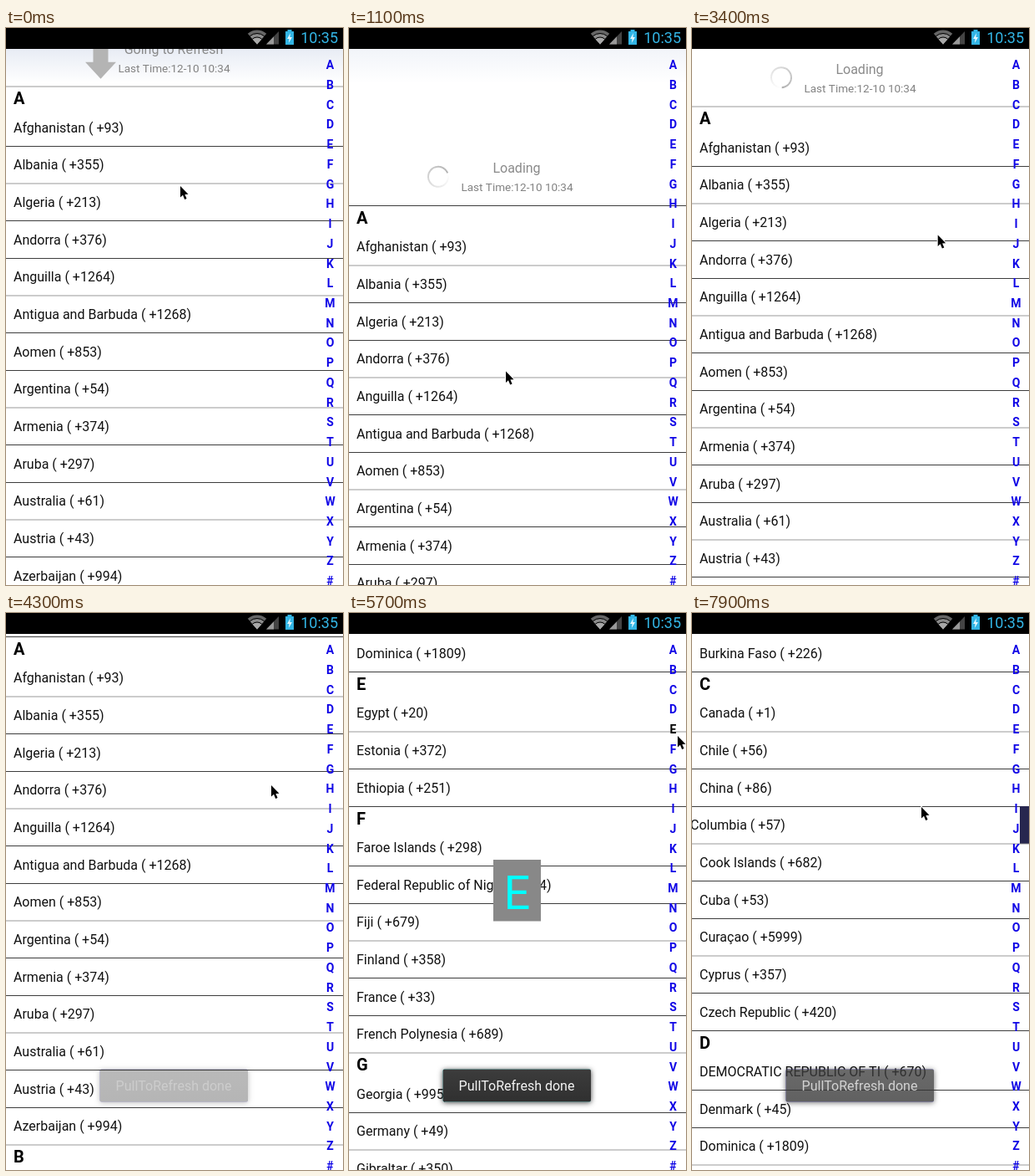
Recreate the animation shown at these times as an HTML page with a canvas. Size 404 px wide and 666 px high, loop 8 s.

```html
<!DOCTYPE html>
<html lang="en">
<head>
<meta charset="utf-8">
<title>Pull to refresh list</title>
<style>
html, body { margin: 0; width: 100%; height: 100%; overflow: hidden; background: #fff; }
canvas { display: block; }
</style>
</head>
<body>
<canvas id="stage" width="404" height="666"></canvas>
<script>
const ctx = document.getElementById('stage').getContext('2d');
const W = 404, H = 666, LOOP = 8000, STEP = 100;
const BAR = 25;                        // status bar height
const ROW = 67, HEAD = 40, REST = 37;  // list units, 1.5 per pixel
const LOADING_TOP = 139;
const FONT = 'Roboto, "Noto Sans", sans-serif';
const LETTERS = 'ABCDEFGHIJKLMNOPQRSTUVWXYZ#';

const SECTIONS = {
  A: 'Afghanistan 93,Albania 355,Algeria 213,Andorra 376,Anguilla 1264,Antigua and Barbuda 1268,' +
     'Aomen 853,Argentina 54,Armenia 374,Aruba 297,Australia 61,Austria 43,Azerbaijan 994',
  B: 'Bahamas 1242,Burkina Faso 226',
  C: 'Canada 1,Chile 56,China 86,Columbia 57,Cook Islands 682,Cuba 53,Curaçao 5999,Cyprus 357,Czech Republic 420',
  D: 'DEMOCRATIC REPUBLIC OF TI 670,Denmark 45,Dominica 1809',
  E: 'Egypt 20,Estonia 372,Ethiopia 251',
  F: 'Faroe Islands 298,Federal Republic of Niger 234,Fiji 679,Finland 358,France 33,French Polynesia 689',
  G: 'Georgia 995,Germany 49,Gibraltar 350'
};

const items = [];
for (const [letter, rows] of Object.entries(SECTIONS)) {
  rows.split(',').forEach((row, i) => {
    const cut = row.lastIndexOf(' ');
    items.push({ label: `${row.slice(0, cut)} ( +${row.slice(cut + 1)})`, head: i ? '' : letter });
  });
}

// time, x, y of the pointer tip
const POINTER = [
  [0, 209, 189], [1000, 188, 410], [1200, 188, 411], [2000, 241, 331], [2800, 266, 298],
  [3600, 300, 238], [4300, 318, 206], [5200, 393, 152], [5700, 394, 147], [6200, 391, 128],
  [6600, 390, 99], [6900, 389, 92], [7500, 292, 232], [7700, 286, 232], [7900, 275, 232], [8000, 266, 232]
];

const clamp = v => Math.max(0, Math.min(1, v));
const span = (t, a, b) => clamp((t - a) / (b - a));
const mix = (a, b, p) => a + (b - a) * p;
const smooth = p => p * p * (3 - 2 * p);
const slow = p => 1 - (1 - p) * (1 - p);
const toY = n => n * 2 / 3 + 1;

function pointerAt(t) {
  let i = 0;
  while (i < POINTER.length - 2 && t >= POINTER[i + 1][0]) i++;
  const [t0, x0, y0] = POINTER[i], [t1, x1, y1] = POINTER[i + 1];
  const p = smooth(span(t, t0, t1));
  return [mix(x0, x1, p), mix(y0, y1, p)];
}

function listTop(t) {
  if (t < 1100) return mix(103, 317, smooth(span(t, 0, 1050)));
  if (t < 3980) return mix(317, LOADING_TOP, slow(span(t, 1100, 1500)));
  return mix(LOADING_TOP, REST, slow(span(t, 3980, 4380)));
}

function touchedLetter(t) {
  if (t < 5300 || t >= 7000) return '';
  return t < 6300 ? 'E' : t < 6650 ? 'D' : 'C';
}

function text(str, x, y, size, color, align = 'left', weight = 400) {
  ctx.font = `${weight} ${size}px ${FONT}`;
  ctx.fillStyle = color;
  ctx.textAlign = align;
  ctx.fillText(str, x, y);
}

function rect(x, y, w, h, color) {
  ctx.fillStyle = color;
  ctx.fillRect(x, y, w, h);
}

function path(points, color) {
  ctx.beginPath();
  points.forEach(([x, y]) => ctx.lineTo(x, y));
  ctx.closePath();
  ctx.fillStyle = color;
  ctx.fill();
}

// A hairline that falls on one pixel row or is shared by two
function divider(n) {
  const k = Math.floor(n / 3), part = n - 3 * k;
  if (part === 1) rect(0, 2 * k + 1, W, 2, 'rgba(0,0,0,.2)');
  else rect(0, 2 * k + (part ? 2 : 1), W, 1, 'rgba(0,0,0,.76)');
}

function drawRefresh(t, top) {
  const y = toY(top);
  const glow = mix(1, 0, span(t, 0, 2600));
  const shade = ctx.createLinearGradient(0, BAR, 0, 66);
  shade.addColorStop(0, `rgba(222,228,240,${0.7 * glow})`);
  shade.addColorStop(1, 'rgba(222,228,240,0)');
  rect(0, BAR, W, 42, shade);

  const loading = t >= 1100;
  text(loading ? 'Loading' : 'Going to Refresh', 201, y - 39, 16, '#8a8a8a', 'center');
  text('Last Time:12-10 10:34', 201.5, y - 17, 13.5, '#828282', 'center');

  ctx.save();
  if (loading) {
    ctx.translate(107, y - 34.5);
    ctx.rotate(t / 1000 * Math.PI * 2 - 1);
    ctx.lineWidth = 2;
    for (let i = 0; i < 24; i++) {
      ctx.strokeStyle = `rgba(120,120,120,${0.6 * i / 24})`;
      ctx.beginPath();
      ctx.arc(0, 0, 12, i * Math.PI / 12, (i + 1) * Math.PI / 12);
      ctx.stroke();
    }
  } else {
    ctx.translate(113.5, y - 34);
    ctx.rotate(-Math.PI * span(top, 140, 190));
    path([[-9, -25], [9, -25], [9, 5], [18.5, 5], [0, 25], [-18.5, 5], [-9, 5]], '#b4b4b4');
  }
  ctx.restore();
}

function drawList(first, top, shift) {
  let n = Math.round(top);
  for (let i = first; i < items.length && toY(n) < H; i++) {
    const { label, head } = items[i];
    if (head) {
      text(head, 9, toY(n) + 21.5, 20, '#000', 'left', 700);
      n += HEAD;
    }
    const dx = label.startsWith('Columbia') ? shift : 0;
    if (dx) rect(W - dx, toY(n), dx, ROW * 2 / 3, '#27274f');
    n += ROW;
    text(label, 9 - dx, toY(n) - 16.3, 16, '#111');
    divider(n);
  }
}

function drawIndex(active) {
  [...LETTERS].forEach((c, i) => {
    text(c, 388.5, 49.2 + i * 23.73, 14, c === active ? '#000' : '#1208e6', 'center', 700);
  });
}

function drawBubble(letter) {
  if (!letter) return;
  rect(173, 295, 57, 73.5, '#888');
  text(letter, 201.3, 353.5, 56, '#0ff', 'center');
}

function drawToast(t) {
  const alpha = t < 6000 ? span(t, 4200, 4480) : 1 - span(t, 7820, 8160);
  if (!alpha) return;
  const box = new Path2D();
  box.roundRect(112.5, 545.5, 177.5, 39, 2);
  const outside = new Path2D(box);
  outside.rect(0, 0, W, H);

  ctx.save();
  ctx.globalAlpha = alpha;
  // the shadow lies only around the box, so a faded box stays even
  ctx.save();
  ctx.clip(outside, 'evenodd');
  ctx.shadowColor = 'rgba(0,0,0,.75)';
  ctx.shadowBlur = 6;
  ctx.shadowOffsetY = 1;
  ctx.fill(box);
  ctx.restore();

  const fill = ctx.createLinearGradient(0, 546, 0, 584);
  fill.addColorStop(0, '#3c3c3c');
  fill.addColorStop(1, '#303030');
  ctx.fillStyle = fill;
  ctx.fill(box);
  text('PullToRefresh done', 201, 571.3, 16, '#f4f4f4', 'center');
  ctx.restore();
}

function drawStatus() {
  rect(0, 0, W, BAR, '#000');
  // wifi fan
  [[17, '#666'], [12.5, '#8b8b8b'], [8, '#a8a8a8']].forEach(([r, color]) => {
    ctx.beginPath();
    ctx.moveTo(301, 19.5);
    ctx.arc(301, 19.5, r, -Math.PI * 0.73, -Math.PI * 0.27);
    ctx.fillStyle = color;
    ctx.fill();
  });
  ctx.strokeStyle = '#000';
  ctx.lineWidth = 1;
  [8.5, 13].forEach(r => {
    ctx.beginPath();
    ctx.arc(301, 19.5, r, -Math.PI * 0.73, -Math.PI * 0.27);
    ctx.stroke();
  });
  // signal wedge
  path([[312, 19.5], [327, 19.5], [327, 4]], '#444');
  path([[312, 19.5], [321, 19.5], [321, 10.2]], '#999');
  // charging battery
  rect(337.5, 2, 5, 2.5, '#33b5e5');
  rect(335, 4, 10, 16, '#33b5e5');
  path([[341, 6], [337, 13], [339.6, 13], [338.8, 18], [343, 11], [340.3, 11]], '#e4f6fd');
  text('10:35', 398, 18, 18, '#33b5e5', 'right');
}

function drawPointer(x, y) {
  ctx.save();
  ctx.translate(x, y);
  const arrow = [[0, 0], [0, 13.5], [3, 10.8], [5.2, 16], [7.6, 15], [5.4, 10], [9.5, 9.8]];
  ctx.lineJoin = 'round';
  ctx.lineWidth = 2;
  ctx.strokeStyle = '#fff';
  path(arrow, '#000');
  ctx.stroke();
  path(arrow, '#000');
  ctx.restore();
}

function draw(t) {
  rect(0, 0, W, H, '#fff');
  const [px, py] = pointerAt(t);
  const letter = touchedLetter(t);
  if (t < 5300) {
    const top = listTop(t);
    if (top > REST) {
      drawRefresh(t, top);
      divider(Math.round(top));
    }
    drawList(0, top, 0);
  } else {
    // a jump leaves the last row of the section before in view
    const section = letter || 'C';
    const first = items.findIndex(item => item.head === section) - 1;
    drawList(first, REST, t >= 7700 ? 286 - px : 0);
  }
  drawIndex(letter);
  drawBubble(letter);
  drawToast(t);
  drawStatus();
  drawPointer(px, py);
}

const start = performance.now();
function tick() {
  const t = (performance.now() - start) % LOOP;
  draw(Math.floor(t / STEP) * STEP);
  requestAnimationFrame(tick);
}
tick();
</script>
</body>
</html>
```
